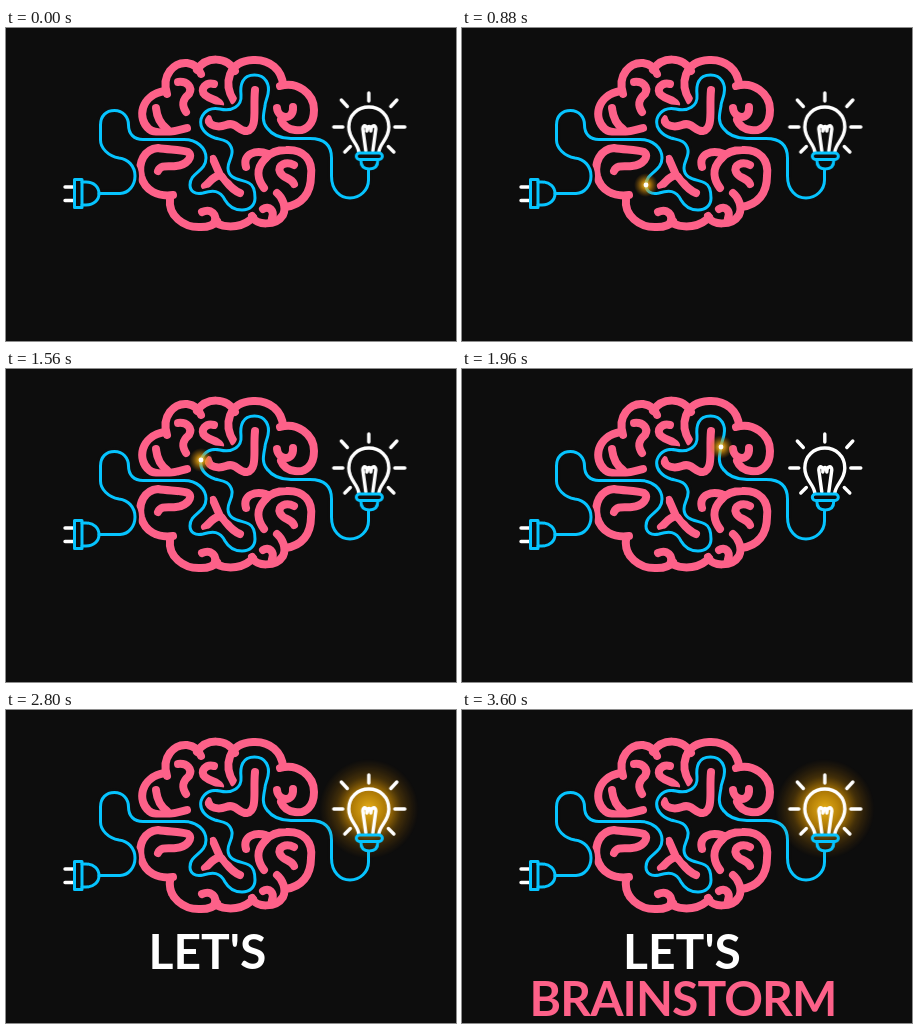
Write an HTML page that moves like this. It is 450x313 px and loops after 4.6 s.

```html
<!DOCTYPE html>
<html lang="en">
<head>
<meta charset="utf-8">
<title>Let's brainstorm</title>
<style>
  html, body { margin: 0; width: 100%; height: 100%; overflow: hidden; background: #0d0d0d; }
  svg { display: block; width: 100vw; height: 100vh; }
  path, rect, circle { stroke-linecap: round; stroke-linejoin: round; }
  .line { fill: none; }
  .brain { stroke: #fd6189; stroke-width: 8; }
  .cyan { stroke: #06c4ff; stroke-width: 3; }
  .white { stroke: #fff; stroke-width: 3.4; }
  .gap { stroke: #0d0d0d; stroke-width: 8; }
  text { font: 700 48px Lato, "Open Sans", sans-serif; text-anchor: middle; }
  .lets { fill: #fff; animation: from-left 4600ms infinite; }
  .storm { fill: #fd6189; letter-spacing: -.9px; animation: from-right 4600ms infinite; }
  .glow { animation: light 4600ms linear infinite; }

  @keyframes from-left {
    0%, 57.38% { visibility: hidden; }
    57.39% { visibility: visible; transform: translateX(-225px); animation-timing-function: cubic-bezier(.215, .61, .355, 1); }
    63.48%, 100% { visibility: visible; transform: none; }
  }
  @keyframes from-right {
    0%, 72.16% { visibility: hidden; }
    72.17% { visibility: visible; transform: translateX(429px); animation-timing-function: cubic-bezier(.215, .61, .355, 1); }
    78.26%, 100% { visibility: visible; transform: none; }
  }
  @keyframes light {
    0%, 55.65% { opacity: 0; }
    60%, 100% { opacity: 1; }
  }
</style>
</head>
<body>
<svg viewBox="0 0 450 313" preserveAspectRatio="none">
  <defs>
    <radialGradient id="warm">
      <stop offset="0" stop-color="#ffc21a" stop-opacity=".9"/>
      <stop offset=".4" stop-color="#f5a800" stop-opacity=".66"/>
      <stop offset=".65" stop-color="#d08a00" stop-opacity=".28"/>
      <stop offset="1" stop-color="#a06000" stop-opacity="0"/>
    </radialGradient>
    <radialGradient id="ember">
      <stop offset="0" stop-color="#ffd860"/>
      <stop offset=".35" stop-color="#f0a810" stop-opacity=".7"/>
      <stop offset="1" stop-color="#b06a00" stop-opacity="0"/>
    </radialGradient>
  </defs>
  <rect width="450" height="313" fill="#0d0d0d"/>

  <g class="line brain">
    <!-- upper lobes -->
    <path d="M181 100C170 103 152 108 143 101C131 91 134 67 159 63"/>
    <path d="M161 66C155 47 168 34 181 35C188 36 193 40 195 46"/>
    <path d="M191 42C200 28 221 28 229 43"/>
    <path d="M228 73C217 56 222 33 247 32C264 31 276 42 277 57"/>
    <path d="M274 58C291 53 308 65 308 82C308 96 300 104 289 102C281 101 277 97 275 92"/>
    <path d="M150 80C151 90 154 96 161 101"/>
    <path d="M172 54C181 53 187 59 183 66C177 71 175 76 180 84"/>
    <path d="M208 56C200 54 193 61 199 67C205 72 211 71 214 76"/>
    <path d="M202 91C203 98 212 100 220 97C230 93 233 104 241 103C252 100 247 82 249 62"/>
    <path d="M271 80C272 91 288 93 287 79"/>
    <!-- lower lobes -->
    <path d="M152 143C155 136 163 139 170 138C181 137 188 128 182 124C174 121 163 122 152 120C138 121 132 135 135 148C139 163 152 169 167 167"/>
    <path d="M164 171C162 187 177 200 195 199C203 199 208 197 211 193"/>
    <path d="M196 184C205 180 212 187 208 195"/>
    <path d="M210 195C222 201 239 199 247 189"/>
    <path d="M246 188C250 198 270 198 277 187C281 179 276 169 271 165"/>
    <path d="M279 179C296 177 305 165 305 148C307 132 298 121 280 122C271 122 265 124 260 130"/>
    <path d="M207 131L214 147C206 149 204 154 199 158M214 147C221 152 222 160 234 165"/>
    <path d="M240 139C236 126 250 121 262 126"/>
    <path d="M259 131C249 141 252 152 258 160"/>
    <path d="M288 137C280 133 271 137 274 144C277 151 285 149 288 156"/>
    <path d="M257 181C263 177 269 183 266 190"/>
  </g>

  <path class="line gap cable"/>
  <path class="line cyan cable"/>

  <path class="line white" d="M59 159H67M59 172.5H67"/>
  <g class="line cyan">
    <rect x="68.5" y="151.5" width="7.5" height="28"/>
    <path d="M76 154H80C88 154 93 159 93 165.5S88 177 80 177H76"/>
  </g>

  <g transform="translate(.8 0)">
    <circle class="glow" cx="362" cy="99" r="50" fill="url(#warm)"/>
    <g class="line white">
      <path d="M352 124C351 115 342 111 342 99C342 87 351 79 362 79S382 87 382 99C382 111 373 115 372 124"/>
      <path d="M359 123L356 101C356 96 361 97 360 103C361 97 364 97 364 103C364 97 369 96 369 101L366 123"/>
      <path d="M362 65V73M334.5 72L340.5 78.5M327 99H336M338 124L343.5 118.5M390 72L384 78.5M398 99H388M387 124L381.5 118.5"/>
    </g>
    <g class="line cyan">
      <rect x="349.5" y="125" width="26" height="6.5" rx="3.2"/>
      <path d="M354 132C354 138 357 141 362.5 141S371 138 371 132"/>
    </g>
  </g>

  <g id="spark" visibility="hidden">
    <circle r="12" fill="url(#ember)"/>
    <circle r="2.4" fill="#fff"/>
  </g>

  <text class="lets" x="220" y="258.5">LET'S</text>
  <text class="storm" x="221" y="306">BRAINSTORM</text>
</svg>
<script>
  const LOOP = 4600, STEP = 40, SPARK_START = 200, SPARK_END = 2440;

  // Each stretch of cable, with the time at which the spark reaches its end.
  const stretches = [
    [200, 'M93 165.5'],
    [880, 'H114C123 165 129 157 129 148C129 138 122 131 113 130C102 128 94.5 120 94.5 112V97C94.500 88 100 82.500 108.500 82.500C117 82.500 122.500 89 122.500 97C122.500 106 128 111.500 137 111.500H178C191 111.500 200 120 200 130C200 144 184 144 184 157'],
    [1280, 'C184 163 189 167 197 165C207 162 214 162 219 172C223 179 228 182 236 182C244 182 249 177 249 170C249 162 247 157 243 155'],
    [1560, 'C236 151 222 152 222 140C222 133 227 129 226 122C224 112 216 112 209 110C200 107 193 100 195 91'],
    [1840, 'C198 82 206 79 214 81C226 84 236 78 235 67C234 57 236 47 248.500 47'],
    [1960, 'C260 47 264 57 262 66C261 71 259 74 259 78'],
    [2400, 'C257 88 256 94 261 100C267 108 275 110.500 285 110.500H304C318 110.500 325.500 117 325.500 130V148C325.500 162 334 170 344 170C354 170 362.500 162 362.500 152V142']
  ];
  const spark = document.getElementById('spark');
  const cables = document.querySelectorAll('.cable');
  const cable = cables[1];

  let route = '';
  const stops = stretches.map(([time, d]) => {
    route += d;
    cable.setAttribute('d', route);
    return { time, length: cable.getTotalLength() };
  });
  cables.forEach(path => path.setAttribute('d', route));

  function sparkLength(time) {
    const i = stops.findIndex(stop => stop.time >= time);
    if (i < 0) return stops[stops.length - 1].length;
    if (i === 0) return 0;
    const a = stops[i - 1], b = stops[i];
    return a.length + (b.length - a.length) * (time - a.time) / (b.time - a.time);
  }

  const start = performance.now();
  function draw() {
    const time = (performance.now() - start) % LOOP;
    const active = time >= SPARK_START && time < SPARK_END;
    spark.setAttribute('visibility', active ? 'visible' : 'hidden');
    if (active) {
      const { x, y } = cable.getPointAtLength(sparkLength(Math.floor(time / STEP) * STEP));
      spark.setAttribute('transform', `translate(${x} ${y})`);
    }
    requestAnimationFrame(draw);
  }
  draw();
</script>
</body>
</html>
```
